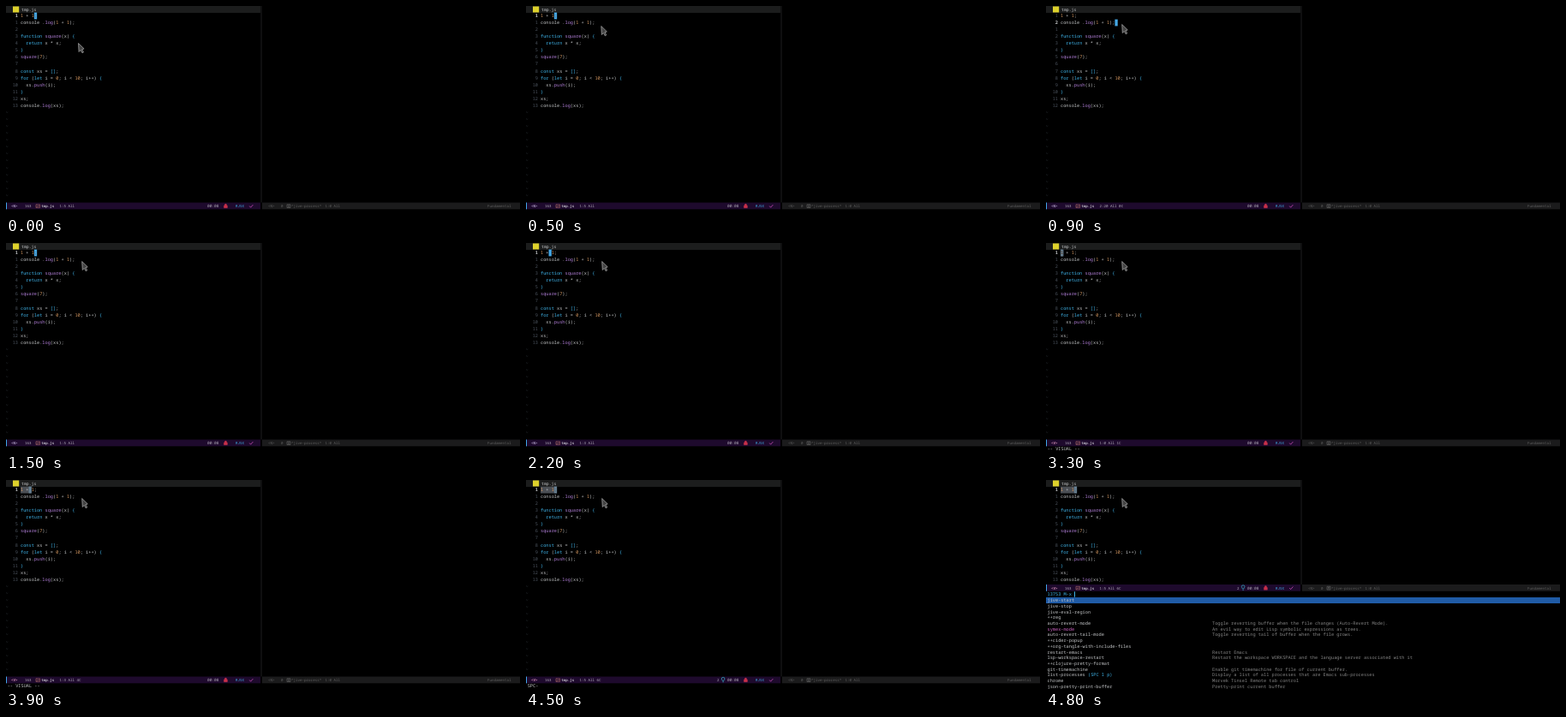
Recreate the animation shown at these times as an HTML page. Size 600x244 px, loop 5000 ms.

```html
<!DOCTYPE html>
<html lang="en">
<head>
<meta charset="utf-8">
<title>Editor session</title>
<style>
html, body { margin: 0; width: 100%; height: 100%; overflow: hidden; background: #000; }
svg { display: block; width: 600px; height: 244px; }
text {
  font: 5.283px "Noto Sans Mono", "DejaVu Sans Mono", monospace;
  fill: #c4c6c8; white-space: pre; text-rendering: geometricPrecision;
}
.bar text { font-size: 4.2px; fill: #b4aebc; }
text.bold { font-weight: 700; }
text.kw, .bar text.kw { fill: #3fb4ea; }
.fn { fill: #b480dc; }
.num { fill: #d99a62; }
.com { fill: #4d5560; }
.tilde { fill: #343a42; }
.bar .dim text { fill: #606060; }
.doc { fill: #858585; }
.pink { fill: #cf62c4; }
</style>
</head>
<body>
<svg id="stage" viewBox="0 0 600 244">
  <rect width="297" height="8" fill="#1c1d1d"/>
  <rect x="8" y=".5" width="7.2" height="7" fill="#ddd12c"/>
  <text x="18" y="6.3" style="font-size:4.8px">tmp.js</text>
  <rect id="region" x="17" y="7.7" width="19" height="7.8" fill="#4b4f55"/>
  <rect id="cursor" width="3.3" height="7.8"/>
  <g id="numbers"></g>
  <g id="code"></g>
  <text id="under"></text>
  <g id="tildes"></g>
  <rect id="divider" x="297" width="2" fill="#0f0f10"/>
  <g id="modeline" class="bar">
    <rect y="229.5" width="297" height="7.8" fill="#1e0a2d"/>
    <rect y="229.5" width="1" height="7.8" fill="#3fa6e6"/>
    <rect x="299" y="229.5" width="301" height="7.8" fill="#1b1b1c"/>
    <text id="mode" class="bold" x="6" y="235.1"></text>
    <text x="22" y="235.1">163</text>
    <path d="M35 231.8h4.6v3.6h-4.6zM35.5 235l1.5-1.8 1 .9 1.2-1.2" fill="none" stroke="#b4706e" stroke-width=".6"/>
    <text class="bold" x="41.2" y="235.1">tmp.js</text>
    <text id="place" x="62.5" y="235.1"></text>
    <g id="bulb">
      <text x="223" y="235.1">2</text>
      <path d="M229.3 234.4c0-1-1-1.2-1-2.3a1.8 1.8 0 0 1 3.6 0c0 1.1-1 1.3-1 2.3zM229.4 235.8h1.5" fill="none" stroke="#35b4c8" stroke-width=".7"/>
    </g>
    <text x="235" y="235.1" style="font-size:4.5px">00:08</text>
    <path d="M254.4 233h4v2.7h-4zM255.2 233v-.7a1.2 1.2 0 0 1 2.4 0v.7" fill="#c8304a" stroke="#c8304a" stroke-width=".4"/>
    <text class="kw" x="268" y="235.1">RJSX</text>
    <path d="M284.2 233.5l1.4 1.7 2.8-3.2" fill="none" stroke="#c24ab2" stroke-width=".8"/>
    <g class="dim">
      <text x="306" y="235.1">&lt;N&gt;</text>
      <text x="321" y="235.1">0</text>
      <path d="M328 231.8h4v3.7h-4zM329 233h2M329 234.3h2" fill="none" stroke="#6c6c6c" stroke-width=".6"/>
      <text x="333" y="235.1">*jive-process*</text>
      <text x="372.5" y="235.1">1:0 All</text>
      <text x="562" y="235.1">Fundamental</text>
    </g>
  </g>
  <text id="echo" x="1.7" y="242.3"></text>
  <g id="menu">
    <rect y="130" width="600" height="114" fill="#000"/>
    <rect y="137" width="600" height="7" fill="#205ba6"/>
    <text class="kw" x="1.5" y="135.2">13753 M-x</text>
    <rect x="33" y="130.3" width="1" height="6.4" fill="#3fb4ea"/>
  </g>
  <path id="pointer" d="M0 0L.6 10 2.6 8 4.5 11.3 6 10.4 4.2 7.2 6.6 6.4Z" fill="#444" stroke="#b0b0b0" stroke-width=".7"/>
</svg>
<script>
const PITCH = 3.17, ROW = 8.07, LEFT = 17, LOOP = 5000;
const $ = id => document.getElementById(id);

const source = `1 + 1;
console .log(1 + 1);

function square(x) {
  return x * x;
}
square(7);

const xs = [];
for (let i = 0; i < 10; i++) {
  xs.push(i);
}
xs;
console.log(xs);`.split('\n');

const commands = [
  ['jive-start'],
  ['jive-stop'],
  ['jive-eval-region'],
  ['++reg'],
  ['auto-revert-mode', 'Toggle reverting buffer when the file changes (Auto-Revert Mode).'],
  ['symex-mode', 'An evil way to edit Lisp symbolic expressions as trees.'],
  ['auto-revert-tail-mode', 'Toggle reverting tail of buffer when the file grows.'],
  ['++cider-popup'],
  ['++org-tangle-with-include-files'],
  ['restart-emacs', 'Restart Emacs'],
  ['lsp-workspace-restart', 'Restart the workspace WORKSPACE and the language server associated with it'],
  ['++clojure-pretty-format'],
  ['git-timemachine', 'Enable git timemachine for file of current buffer.'],
  ['list-processes (SPC l p)', 'Display a list of all processes that are Emacs sub-processes'],
  ['chrome', 'Morvek Tinsel Remote tab control'],
  ['json-pretty-print-buffer', 'Pretty-print current buffer']
];

// Each step lists only what changes from that moment on.
const steps = [
  [0, { row: 0, col: 5, mode: 'N', count: '', echo: '', bulb: false, menu: false, mouse: [84.5, 43.5] }],
  [100, { mouse: [85, 39] }],
  [200, { mouse: [86, 32] }],
  [300, { mouse: [86.8, 26] }],
  [500, { mouse: [87.8, 23.5] }],
  [600, { mouse: [88.7, 21.5] }],
  [800, { row: 1, col: 20 }],
  [900, { count: '0C' }],
  [1000, { count: '' }],
  [1400, { row: 0, col: 5 }],
  [2000, { col: 4 }],
  [2200, { col: 3 }],
  [2400, { col: 2 }],
  [2800, { col: 1 }],
  [2900, { col: 0 }],
  [3100, { mode: 'V', echo: '-- VISUAL --', count: '1C' }],
  [3500, { col: 1, count: '2C' }],
  [3600, { col: 2, count: '3C' }],
  [3800, { col: 3, count: '4C' }],
  [4000, { col: 4, count: '5C' }],
  [4200, { col: 5, count: '6C' }],
  [4300, { bulb: true }],
  [4400, { echo: 'SPC-' }],
  [4800, { menu: true, echo: '' }]
];

function addText(parent, x, y, str, cls = '') {
  const el = document.createElementNS('http://www.w3.org/2000/svg', 'text');
  set(el, { x, y, class: cls });
  el.textContent = str;
  parent.append(el);
  return el;
}

function set(el, attrs) {
  for (const key in attrs) el.setAttribute(key, attrs[key]);
}

function show(id, on) {
  $(id).style.display = on ? '' : 'none';
}

// Rows sit on whole pixels.
const baseline = row => 13 + Math.round(row * ROW);
const rowTop = row => baseline(row) - 5.4;

function tokenClass(word) {
  if (/^(function|return|const|for|let)$/.test(word)) return 'kw';
  if (/^(square|log|push)$/.test(word)) return 'fn';
  if (/^\d+$/.test(word)) return 'num';
  if (/^[{}[\]]+$/.test(word)) return 'kw';
  return '';
}

source.forEach((line, row) => {
  for (const m of line.matchAll(/\w+|[^\w\s]/g))
    addText($('code'), LEFT + m.index * PITCH, baseline(row), m[0], tokenClass(m[0]));
});
const numbers = source.map((_, row) => addText($('numbers'), 14, baseline(row), ''));
numbers.forEach(el => el.setAttribute('text-anchor', 'end'));
for (let row = 14; row < 27; row++) addText($('tildes'), -.4, baseline(row), '~', 'tilde');

commands.forEach(([name, doc], i) => {
  const y = 142.2 + i * 6.7, [, word, key] = name.match(/^(\S+)(.*)$/);
  addText($('menu'), 1.5, y, word, name === 'symex-mode' ? 'pink' : '');
  if (key) addText($('menu'), 1.5 + word.length * PITCH, y, key, 'kw');
  if (doc) addText($('menu'), 194, y, doc, 'doc');
});

function render(s) {
  const visual = s.mode === 'V', x = LEFT + s.col * PITCH;
  set($('cursor'), { x, y: rowTop(s.row), fill: visual ? '#657f92' : '#45a8e6' });
  set($('region'), { width: (s.col + 1) * PITCH });
  show('region', visual);
  set($('under'), { x, y: baseline(s.row), style: 'fill:#101820' });
  $('under').textContent = source[s.row][s.col] || '';

  numbers.forEach((el, row) => {
    const here = row === s.row;
    el.textContent = here ? row + 1 : Math.abs(row - s.row);
    el.setAttribute('class', here ? 'bold' : 'com');
  });

  $('mode').textContent = `<${s.mode}>`;
  $('mode').style.fill = visual ? '#d890b8' : '#a796bd';
  $('place').textContent = `${s.row + 1}:${s.col} All ${s.count}`;
  $('echo').textContent = s.echo;
  show('bulb', s.bulb);
  show('menu', s.menu);
  show('tildes', !s.menu);
  set($('divider'), { height: s.menu ? 122 : 229.5 });
  set($('modeline'), { transform: `translate(0 ${s.menu ? -107.5 : 0})` });
  set($('pointer'), { transform: `translate(${s.mouse})` });
}

let shown = -1;
function tick() {
  const t = performance.now() % LOOP;
  const past = steps.filter(([at]) => at <= t);
  if (past.length !== shown) {
    shown = past.length;
    render(Object.assign({}, ...past.map(step => step[1])));
  }
  requestAnimationFrame(tick);
}
tick();
</script>
</body>
</html>
```
